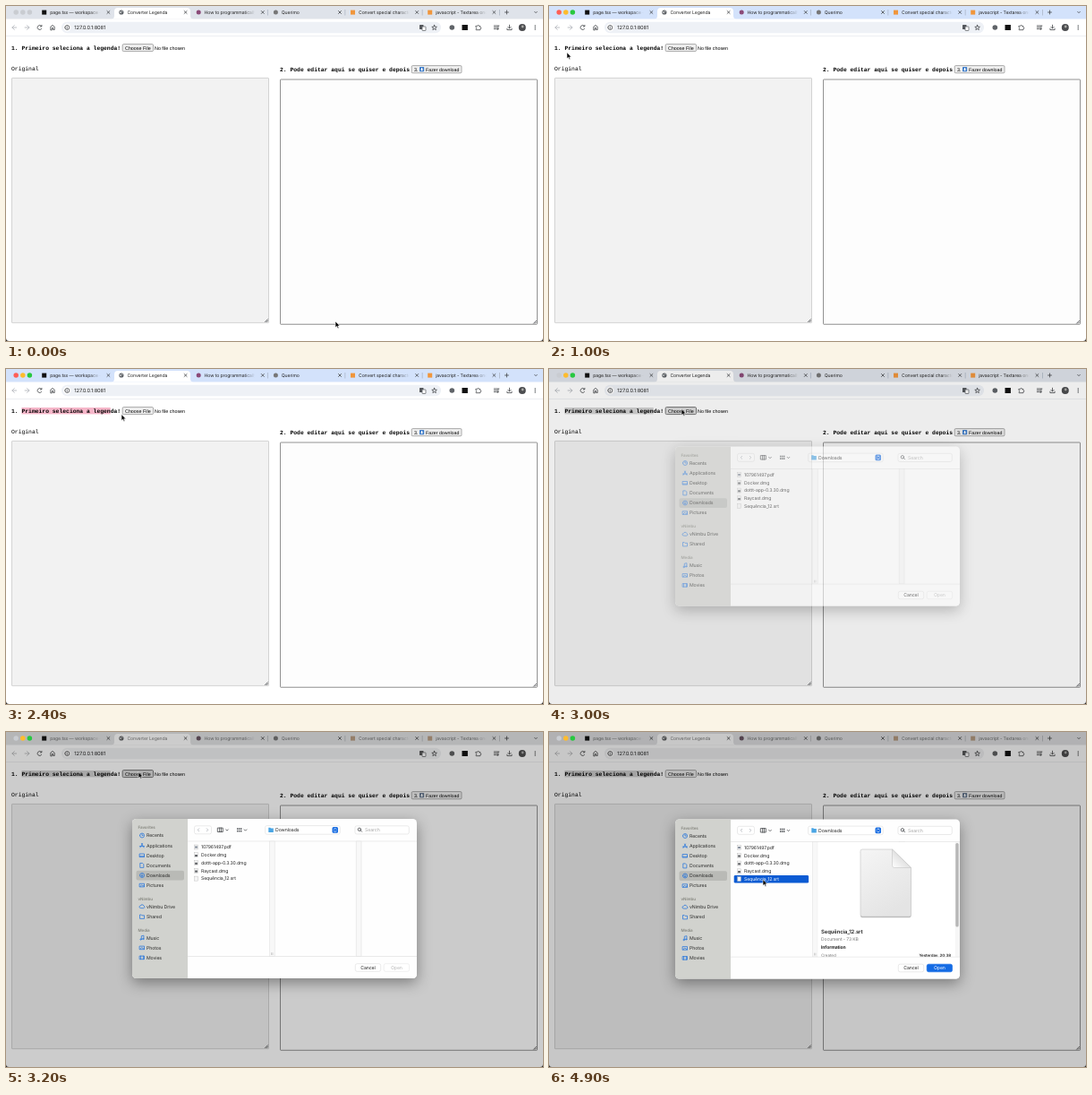
Recreate the animation shown at these times as an HTML page. Size 600 by 374 pixels, loop 5000 ms.

```html
<!DOCTYPE html>
<html lang="en">
<head>
<meta charset="utf-8">
<title>Converter Legenda</title>
<style>
  html, body { margin: 0; width: 100%; height: 100%; overflow: hidden; background: #222; }
  svg { display: block; width: 600px; height: 374px; }
  text { font-family: Inter, sans-serif; letter-spacing: -.02em; text-rendering: geometricPrecision; white-space: pre; }
  .mono { font-family: "Liberation Mono", monospace; letter-spacing: 0; }
  .arial { font-family: "Liberation Sans", sans-serif; letter-spacing: 0; }
  .bold { font-weight: 700; }
  .semi { font-weight: 600; }
  .line { fill: none; stroke: #44474b; stroke-width: .8; stroke-linecap: round; stroke-linejoin: round; }
  .pale { stroke: #aeb2b8; }
  .blue { stroke: #2474dc; stroke-width: .75; }
  #sheet { filter: drop-shadow(0 5px 8px rgba(0, 0, 0, .38)); }
</style>
</head>
<body>
<svg id="stage" viewBox="0 0 600 374"></svg>
<script>
const LOOP = 5000, STEP = 100;

const text = (x, midY, str, size = 5.2, attrs = '') =>
  `<text x="${x}" y="${midY + size * .36}" font-size="${size}" ${attrs}>${str}</text>`;
const rect = (x, y, w, h, fill, attrs = '') =>
  `<rect x="${x}" y="${y}" width="${w}" height="${h}" fill="${fill}" ${attrs}/>`;
const dot = (x, y, r, fill, attrs = '') =>
  `<circle cx="${x}" cy="${y}" r="${r}" fill="${fill}" ${attrs}/>`;
const icon = (x, y, d, cls = '') =>
  `<path class="line ${cls}" transform="translate(${x} ${y})" d="${d}"/>`;

const CROSS = 'M-1.5-1.5L1.5 1.5M1.5-1.5L-1.5 1.5';
const DOWN = 'M-1.3-.6L0 .7L1.3-.6';
const RING = 'M-2.5 0a2.5 2.5 0 1 0 5 0a2.5 2.5 0 1 0-5 0';
const BOX = 'M-2.5-1.8h5v3.6h-5z';
const PAGE = 'M-1.8-2.5h2.3l1.3 1.3v3.7h-3.6z';

const globe = (x, y) => dot(x, y, 2.6, '#5f6368') +
  `<path d="M${x - 1.6} ${y - 1}l1.6 .8l-.5 1.4l-1-.6zM${x + .4} ${y - 2}l1.4 1l-.9 .7z" fill="#fff"/>`;

function tabs() {
  const badge = color => rect(40.5, 4.6, 5, 5, color).replace('x="40.5"', 'x="5.2"');
  const list = [
    [35, badge('#111'), 'page.tsx — workspace — '],
    [121.2, globe(7.7, 7), 'Converter Legenda'],
    [207.4, dot(7.8, 7, 2.5, '#8b4a78'), 'How to programmatically'],
    [293.6, dot(7.8, 7, 2.5, '#777'), 'Querimo'],
    [379.8, badge('#f0963c'), 'Convert special character'],
    [466, badge('#f0963c'), 'javascript - Textarea onch'],
  ];
  return list.map(([x, mark, title], i) =>
    `<g transform="translate(${x} 0)">${mark}
      ${text(14.2, 7, title, 5.15, 'fill="url(#fade)" class="title"')}
      ${icon(79.4, 7, CROSS)}
      ${i > 1 ? rect(85, 4, .6, 6.5, '#9fa8b8') : ''}</g>`).join('');
}

function browser() {
  return `
    ${rect(0, 0, 600, 374, '#fff')}
    ${rect(0, 0, 600, 14.5, '#dfe3ea', 'id="strip"')}
    <path d="M117.5 14.6q3.5 0 3.5-3.5v-5q0-4 4-4h77q4 0 4 4v5q0 3.5 3.5 3.5z" fill="#fff"/>
    ${tabs()}
    ${icon(559.5, 7, 'M-2 0H2M0-2V2')}${icon(592, 7, DOWN)}
    ${rect(0, 33.4, 600, .6, '#e2e5ea')}
    ${icon(9.3, 24, 'M2.4 0H-2.4M0-2.4L-2.4 0L0 2.4', 'pale')}
    ${icon(23.5, 24, 'M-2.4 0H2.4M0-2.4L2.4 0L0 2.4', 'pale')}
    ${icon(37.7, 24, 'M2 1.4A2.5 2.5 0 1 1 1.8-1.7M2.2-2.7v1.6h-1.6')}
    ${icon(52, 24, 'M-2.2 2.5v-3.3L0-2.6L2.2-.8V2.5H.7V.5H-.7V2.5z')}
    ${rect(62, 17.8, 424, 12.4, '#eef1f6', 'rx="6.2"')}
    ${dot(68.3, 24, 4.3, '#fff')}
    ${icon(68.3, 24, RING + 'M0 0V1.2M0-1.2v.1')}
    ${text(76.3, 24, '127.0.0.1:8081', 5.75, 'fill="#222"')}
    ${rect(462, 21, 4.5, 5, '#55585d', 'rx=".6"')}${rect(465, 23, 4, 4.5, '#fff', 'rx=".5" stroke="#55585d" stroke-width=".7"')}
    ${icon(478.6, 24, 'M0-2.7L.8-.8L2.8-.7L1.2 .6L1.7 2.6L0 1.5L-1.7 2.6L-1.2 .6L-2.8-.7L-.8-.8z')}
    ${dot(498.3, 24, 2.8, '#5f6368')}${rect(509.5, 21, 6.4, 6, '#111')}
    ${icon(527.5, 24, 'M-2.3-1.6h1.5a.9.9 0 0 1 1.8 0h1.4v1.4a.9.9 0 0 1 0 1.8v1.1h-4.7v-1.4a.9.9 0 0 0 0-1.6z')}
    ${icon(548, 24, 'M-2.7-2H1.5M-2.7-.2H.6M-2.7 1.6H-.5M1.9 1.8V-2h1M1.9 1.7a.7.7 0 1 1-1.4 0a.7.7 0 1 1 1.4 0')}
    ${icon(562.5, 24, 'M0-2.8V.9M-1.6-.6L0 1L1.6-.6M-2.6 1.2V2.6H2.6V1.2')}
    ${dot(576.8, 24, 4, '#4c4d50')}${dot(577.2, 23, 1.4, '#a9a9a6')}
    ${[-2, 0, 2].map(d => dot(591.2, 24 + d, .65, '#44474b')).join('')}`;
}

function page() {
  const button = (x, y, w, h, id) =>
    rect(x, y, w, h, '#efefef', `rx="1.2" stroke="#767676" stroke-width=".6" ${id}`);
  const area = (x, y, fill, stroke) =>
    rect(x, y, 287, 273.3, fill, `stroke="${stroke}" stroke-width=".8" rx=".6"`) +
    icon(x + 284.5, y + 270.8, 'M-1.5 1.5L1.5-1.5M.2 1.5L1.5 .2', 'grip');
  return `
    ${rect(17.5, 43, 0, 7.4, '#f6b6c9', 'id="selection"')}
    ${text(6, 46.6, '1. Primeiro seleciona a legenda!', 6.37, 'class="mono bold"')}
    ${button(130.2, 42.6, 34.3, 8, 'id="choose"')}
    ${text(133, 46.7, 'Choose File', 5.38, 'class="arial"')}
    ${text(166, 46.7, 'No file chosen', 5.38, 'class="arial"')}
    ${text(6, 70, 'Original', 6.37, 'class="mono"')}
    ${text(306, 70.9, '2. Pode editar aqui se quiser e depois', 6.37, 'class="mono bold"')}
    ${button(453.2, 66.6, 55.8, 8.2, '')}
    ${text(456, 70.8, '3.', 5.38, 'class="arial"')}
    ${rect(462, 68, 5.2, 5.2, '#3d7cc9', 'rx=".8"')}
    <path d="M464 68.9h1.2v1.9h1.1l-1.7 1.8l-1.7-1.8h1.1z" fill="#fff"/>
    ${text(469, 70.8, 'Fazer download', 5.25, 'class="arial"')}
    ${area(6.5, 80.4, '#f2f2f2', '#c9c9c9')}
    ${area(306.5, 82, '#fdfdfd', '#767676')}`;
}

function sidebar() {
  const heads = [[107, 'Favorites'], [186.4, 'vNimbu'], [221.4, 'Media']];
  const items = [
    [116, 'Recents', RING + 'M0-1.5V0H1.2'],
    [127.2, 'Applications', 'M-2 2.2L.5-2.2M2 2.2L-.5-2.2M-2.7 .9H2.7'],
    [138.3, 'Desktop', BOX + 'M-2.5 .9h5'],
    [149.4, 'Documents', PAGE],
    [160.5, 'Downloads', RING + 'M0-1.3V1.2M-1 .3L0 1.3L1 .3'],
    [171.6, 'Pictures', BOX + 'M-2 1.5L-.4-.4L.7 .8L1.4 .2L2.3 1.5'],
    [195.4, 'vNimbu Drive', 'M-1.7 1.7a1.3 1.3 0 0 1 0-2.6a1.9 1.9 0 0 1 3.6 .1a1.3 1.3 0 0 1 0 2.5z'],
    [206.5, 'Shared', 'M-2.5 2V-2h1.7l.7 .8h2.6V2z'],
    [230.4, 'Music', 'M-.7 1.6V-2.2L1.9-2.7V1.1M-.7 1.6a.7.7 0 1 1-1.4 0a.7.7 0 1 1 1.4 0M1.9 1.1a.7.7 0 1 1-1.4 0a.7.7 0 1 1 1.4 0'],
    [241.4, 'Photos', BOX + 'M-2 1.5L-.4-.4L2.3 1.5'],
    [252.4, 'Movies', BOX + 'M-1.4-1.8V1.8M1.4-1.8V1.8'],
  ];
  return rect(141, 97, 62, 179, '#d1d2ce') +
    rect(145.5, 155.2, 53.5, 10.8, '#b9bab6', 'rx="2"') +
    heads.map(([y, s]) => text(147.5, y, s, 4.5, 'class="semi" fill="#85867f"')).join('') +
    items.map(([y, s, d]) => icon(152, y, d, 'blue') + text(157, y, s, 5.2, 'fill="#2b2b2a"')).join('');
}

function fileList() {
  const names = ['107961497.pdf', 'Docker.dmg', 'dottt-app-0.3.30.dmg', 'Raycast.dmg', 'Sequência_12.srt'];
  return names.map((name, i) => {
    const y = 129 + i * 8.78, disk = i > 0 && i < 4;
    return rect(210.6, y - 2.5, 3.8, 5, '#f5f5f5', 'stroke="#b5b5b5" stroke-width=".4"') +
      (i < 4 ? rect(211.2, y - (disk ? .3 : 1), 2.6, 2.1, disk ? '#55585c' : '#7c8694') : '') +
      text(218, y, name, 5.15, `fill="#262626" ${i === 4 ? 'id="picked"' : ''}`);
  }).join('');
}

function preview() {
  return `<g id="preview">
    ${rect(300.3, 123, 158.7, 128, '#fff')}
    ${rect(453.8, 123, 5.2, 128, '#f6f6f6')}${rect(454.3, 124, 3.4, 93.5, '#b7b7b7', 'rx="1.5"')}
    <path d="M350 131.5h33.5l21 20.5v52.5q0 2-2 2h-52.5q-2 0-2-2v-71q0-2 2-2z" transform="translate(0 .8)" fill="#bbb"/>
    <path d="M350 131h33.5l21 20.5v52.5q0 2-2 2h-52.5q-2 0-2-2v-71q0-2 2-2z" fill="url(#paper)" stroke="#c4c4c4" stroke-width=".6"/>
    <path d="M383.5 131l21 20.5h-18.5q-2.5 0-2.5-2.5z" fill="url(#fold)" stroke="#bdbdbd" stroke-width=".5"/>
    ${text(304, 222.6, 'Sequência_12.srt', 5.95, 'class="semi" fill="#222"')}
    ${text(304, 230.9, 'Document - 73 KB', 5, 'fill="#777"')}
    ${text(304, 240.4, 'Information', 5.05, 'class="bold" fill="#222"')}
    ${text(304, 249.5, 'Created', 4.6, 'fill="#777"')}
    ${text(449, 249.5, 'Yesterday, 20:38', 4.5, 'class="semi" fill="#222" text-anchor="end"')}
  </g>`;
}

function dialog() {
  const field = (x, y, w, h, attrs = '') =>
    rect(x, y, w, h, '#fff', `rx="2" stroke="#dcdcdc" stroke-width=".6" ${attrs}`);
  const track = x => rect(x, 122.5, 5.8, 128.5, '#f8f8f8', 'stroke="#e2e2e2" stroke-width=".6"');
  return `<g clip-path="url(#rounded)">
    ${rect(141, 97, 318, 179, '#fefefe')}
    ${sidebar()}
    ${rect(203, 122.2, 256, .6, '#dedede')}
    ${field(210.5, 105.3, 19, 9)}
    ${icon(215, 109.8, 'M.7-1.5L-.8 0L.7 1.5', 'pale')}${icon(225, 109.8, 'M-.7-1.5L.8 0L-.7 1.5', 'pale')}
    ${icon(239.5, 109.8, 'M-2.8-2.2h5.6v4.4h-5.6zM-.9-2.2v4.4M.9-2.2v4.4')}${icon(247, 110, DOWN)}
    ${[0, 1].map(r => [0, 1, 2].map(c => rect(258 + c * 2, 107.7 + r * 2.6, 1.4, 1.7, '#55585c')).join('')).join('')}
    ${icon(267.5, 110, DOWN)}
    ${field(289.6, 105.1, 83.6, 9.6)}
    <path d="M293.3 107.2h2l.7 .8h2.8v4.6h-5.5z" fill="#4aa5e4"/>
    ${text(301, 109.9, 'Downloads', 5.2, 'fill="#262626"')}
    ${rect(364.5, 106.6, 6.5, 6.6, '#1c6fe2', 'rx="1.5"')}
    <path d="M366.3 109.3l1.5-1.5l1.5 1.5M366.3 110.6l1.5 1.5l1.5-1.5" fill="none" stroke="#fff" stroke-width=".7"/>
    ${field(390, 105.3, 60.3, 9.2)}
    ${icon(395.3, 109.6, 'M.9 .8L2.3 2.2M1.3-.3a1.7 1.7 0 1 1-3.4 0a1.7 1.7 0 1 1 3.4 0')}
    ${text(401, 109.9, 'Search', 5.2, 'fill="#a8a8a8"')}
    ${track(294.4)}${track(391.2)}
    ${rect(296.3, 246.7, .5, 2.8, '#aaa')}${rect(297.7, 246.7, .5, 2.8, '#aaa')}
    ${rect(206.7, 160, 83.4, 8.6, '#0b5bd3', 'rx="1.4" id="row"')}
    ${fileList()}
    ${preview()}
    ${rect(203, 251, 256, 25, '#fefefe')}${rect(203, 250.8, 256, .6, '#dedede')}
    ${field(390.3, 259.2, 28.4, 8.6)}${text(404.5, 263.5, 'Cancel', 5.2, 'text-anchor="middle" fill="#222"')}
    ${field(422.2, 259.2, 28.4, 8.6, 'id="open"')}
    ${text(436.4, 263.5, 'Open', 5.2, 'text-anchor="middle" id="openLabel"')}
  </g>`;
}

const gradient = (id, attrs, stops) => `<linearGradient id="${id}" ${attrs}>` +
  stops.map(([o, c, a = 1]) => `<stop offset="${o}" stop-color="${c}" stop-opacity="${a}"/>`).join('') + '</linearGradient>';

document.getElementById('stage').innerHTML = `
  <defs>
    ${gradient('fade', 'gradientUnits="userSpaceOnUse" x1="58" x2="71" y1="0" y2="0"', [[0, '#222'], [1, '#222', 0]])}
    ${gradient('paper', 'x2="0.5" y2="1"', [[0, '#f5f5f5'], [1, '#e4e4e4']])}
    ${gradient('fold', 'x1="1" y1="0" x2="0" y2="1"', [[0.5, '#e2e2e2'], [1, '#fff']])}
    <clipPath id="rounded">${rect(141, 97.5, 318, 178, '#000', 'rx="4.5"')}</clipPath>
    <clipPath id="window"><path d="M0 0H600V370.5q0 3.5-3.5 3.5H3.5q-3.5 0-3.5-3.5z"/></clipPath>
  </defs>
  <g clip-path="url(#window)">
    <g id="browser">${browser()}${page()}</g>
    ${rect(0, 0, 600, 374, '#000', 'id="dim"')}
    ${[11.2, 18.8, 26.4].map(x => dot(x, 7, 2.75, '#ccc', 'class="light"')).join('')}
  </g>
  <g id="sheet">${dialog()}</g>
  <g id="cursor">
    <path id="arrow" d="M0 0V7L1.6 5.5L2.7 8L3.9 7.5L2.8 5.1H5z" fill="#000" stroke="#fff" stroke-width=".6"/>
    <path id="beam" d="M-1.2-3.6Q0-3.6 0-2.8Q0-3.6 1.2-3.6M0-2.8V2.8M-1.2 3.6Q0 3.6 0 2.8Q0 3.6 1.2 3.6" class="line"/>
  </g>`;

// Each row: time, then the values reached at that time.
const POINTER = [
  [0, 368, 352], [100, 365, 348], [300, 262, 262], [600, 112, 144], [800, 46, 88],
  [1000, 20, 51.8], [1200, 19, 62], [1400, 18, 55], [1600, 18, 47], [1800, 18, 47],
  [2200, 116, 47], [2300, 116, 47], [2400, 129, 50.6], [2500, 133, 60], [2600, 137, 63],
  [2700, 137, 63], [2800, 145, 48], [2900, 148, 44.6], [3300, 148, 44.6], [3500, 172, 105],
  [3700, 212, 196], [3800, 223, 178], [3900, 226.5, 165], [4000, 227, 164.3], [4600, 227, 164.3],
  [4700, 232, 164.4], [4900, 239, 164.6],
];
const SELECTION = [[1800, 0], [2200, 99.2]];
const SHEET = [[2900, -18, 0], [3000, -11, .6], [3100, -3.8, 1], [3200, -.5, 1], [3300, 0, 1]];
const DIM = [[2800, 0], [2900, .03], [3000, .07], [3100, .15], [3200, .2], [3300, .22]];

function sample(track, t) {
  const next = track.findIndex(row => row[0] > t);
  if (next === 0) return track[0].slice(1);
  if (next < 0) return track[track.length - 1].slice(1);
  const a = track[next - 1], b = track[next], k = (t - a[0]) / (b[0] - a[0]);
  return a.slice(1).map((v, i) => v + (b[i + 1] - v) * k);
}

const $ = id => document.getElementById(id);
const set = (id, attrs) => Object.entries(attrs).forEach(([k, v]) => $(id).setAttribute(k, v));
const show = (id, on) => set(id, { visibility: on ? 'visible' : 'hidden' });
const lights = document.querySelectorAll('.light');
const titles = document.querySelectorAll('.title');

function draw(t) {
  const active = t >= 200 && t < 2900, modal = t >= 2900, muted = t >= 3200;
  const picked = t >= 4200, loaded = t >= 4300, beam = t >= 1500 && t < 2400;
  const [x, y] = sample(POINTER, t), [drop, alpha] = sample(SHEET, t);

  set('strip', { fill: active ? '#d3e2fb' : '#dfe3ea' });
  ['#ff5f57', '#febc2e', '#28c840'].forEach((color, i) =>
    lights[i].setAttribute('fill', active || (modal && i) ? color : '#c9ccd1'));
  titles.forEach(el => el.setAttribute('opacity', muted ? .6 : 1));
  $('browser').style.filter = muted ? 'saturate(.3)' : 'none';

  set('selection', { width: sample(SELECTION, t)[0], fill: modal ? '#d2d2d2' : '#f6b6c9' });
  const pressed = t >= 2800 && t < 3300;
  set('choose', { fill: pressed ? '#dcdcdc' : '#efefef', 'stroke-width': pressed ? 1 : .6 });
  set('dim', { opacity: sample(DIM, t)[0] });

  set('sheet', { transform: `translate(0 ${drop})`, opacity: alpha });
  show('sheet', alpha > 0);
  set('row', { opacity: picked ? 1 : 0 });
  set('picked', { fill: picked ? '#fff' : '#262626' });
  set('preview', { opacity: loaded ? 1 : 0 });
  set('open', { fill: loaded ? '#146be4' : '#fff', stroke: loaded ? '#146be4' : '#e6e6e6' });
  set('openLabel', { fill: loaded ? '#fff' : '#b8b8b8' });

  set('cursor', { transform: `translate(${x} ${y})` });
  show('arrow', !beam);
  show('beam', beam);
}

function tick() {
  draw(Math.floor(performance.now() % LOOP / STEP) * STEP);
  requestAnimationFrame(tick);
}
tick();
</script>
</body>
</html>
```
